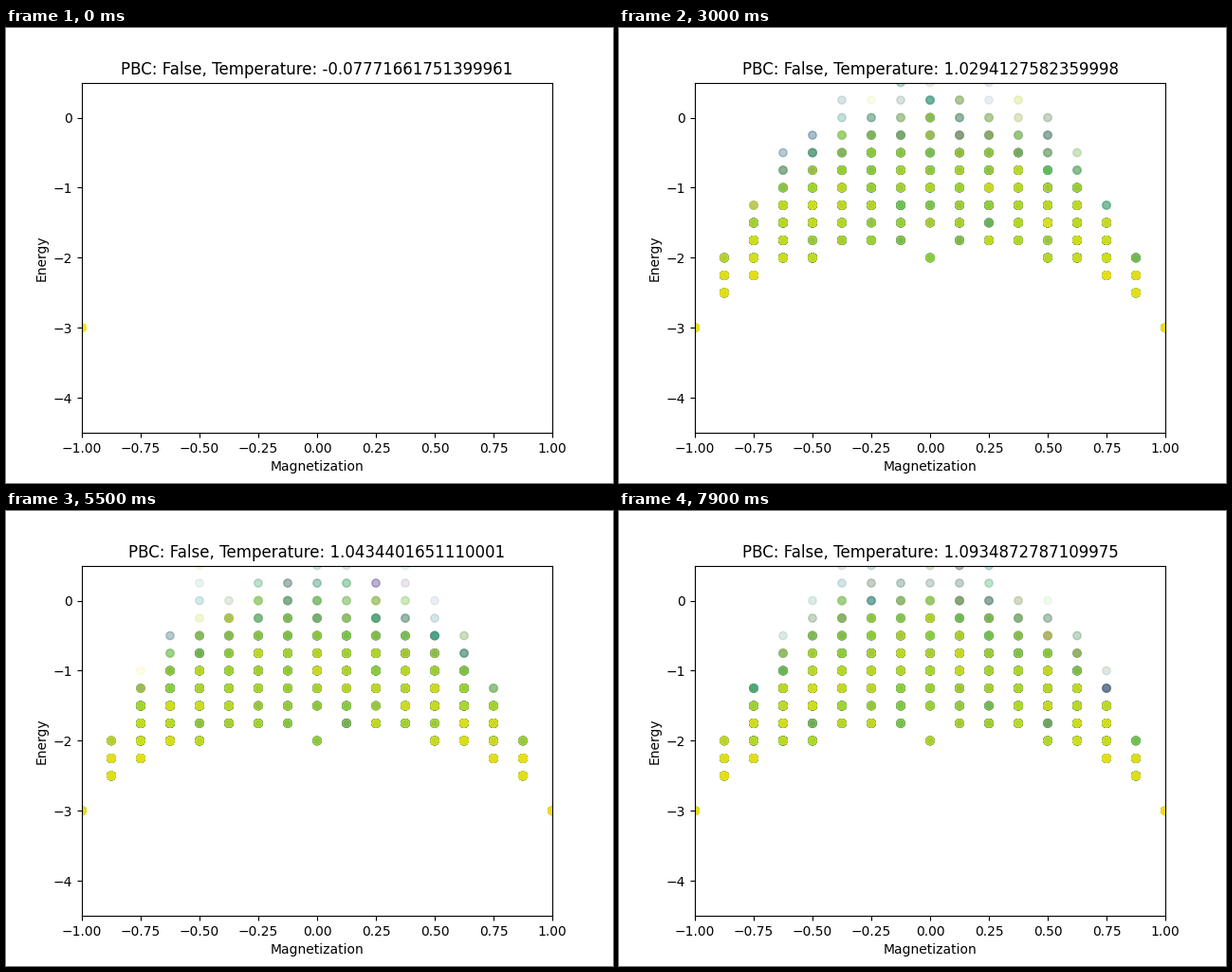
A matplotlib script for the animation above (8 s loop, 640 by 480 pixels).

```python
import numpy as np
import matplotlib.pyplot as plt
from matplotlib.animation import FuncAnimation

FRAMES, INTERVAL = 80, 100
SIDE = 4
SAMPLES = 8000
MAX_LAYERS = 130  # older dots in a pile no longer show

# Temperature schedule: frame index -> value
STEPS = [0, 3, 8, 18, 30, 48, 55, 67, 79]
TEMPS = [-0.07771661751399961, 0.6713846201739942, 0.8324190715439973,
         0.9135462899359988, 1.0294127582359998, 1.043436855686,
         1.0434401651110001, 1.0463254499109997, 1.0934872787109975]


def density_of_states():
    """All (magnetization, energy) levels of the open lattice and their counts."""
    codes = np.arange(2 ** SIDE ** 2)[:, None]
    bits = codes >> np.arange(SIDE ** 2) & 1
    spins = (2 * bits - 1).reshape(-1, SIDE, SIDE)
    bonds = ((spins[:, 1:] * spins[:, :-1]).sum((1, 2))
             + (spins[:, :, 1:] * spins[:, :, :-1]).sum((1, 2)))
    pairs = np.column_stack([spins.sum((1, 2)), -2 * bonds])
    levels, counts = np.unique(pairs, axis=0, return_counts=True)
    return levels / SIDE ** 2, counts


LEVELS, COUNTS = density_of_states()


def sample(temp, seed):
    """Level index visited at every step; frozen in the down state if temp <= 0."""
    if temp <= 0:
        return np.zeros(SAMPLES, int)
    energy = LEVELS[:, 1] - LEVELS[:, 1].min()
    weight = COUNTS * np.exp(-4 * energy / temp)
    rng = np.random.default_rng(seed)
    return rng.choice(len(LEVELS), SAMPLES, p=weight / weight.sum())


fig, ax = plt.subplots(figsize=(6.4, 4.8), dpi=100)
ax.set(xlim=(-1, 1), ylim=(-4.5, 0.5), xlabel="Magnetization", ylabel="Energy")
title = ax.set_title("")
dots = ax.scatter([], [], c=[], cmap="viridis", vmin=0, vmax=SAMPLES - 1, alpha=0.1)


def update(i):
    temp = float(np.interp(i, STEPS, TEMPS))
    visits = sample(temp, i)
    times = np.concatenate([np.flatnonzero(visits == k)[-MAX_LAYERS:]
                            for k in np.unique(visits)])
    dots.set_offsets(LEVELS[visits[times]])
    dots.set_array(times.astype(float))
    title.set_text(f"PBC: False, Temperature: {temp}")
    return dots, title


anim = FuncAnimation(fig, update, frames=FRAMES, interval=INTERVAL,
                     repeat=True, repeat_delay=0)
plt.show()
```
